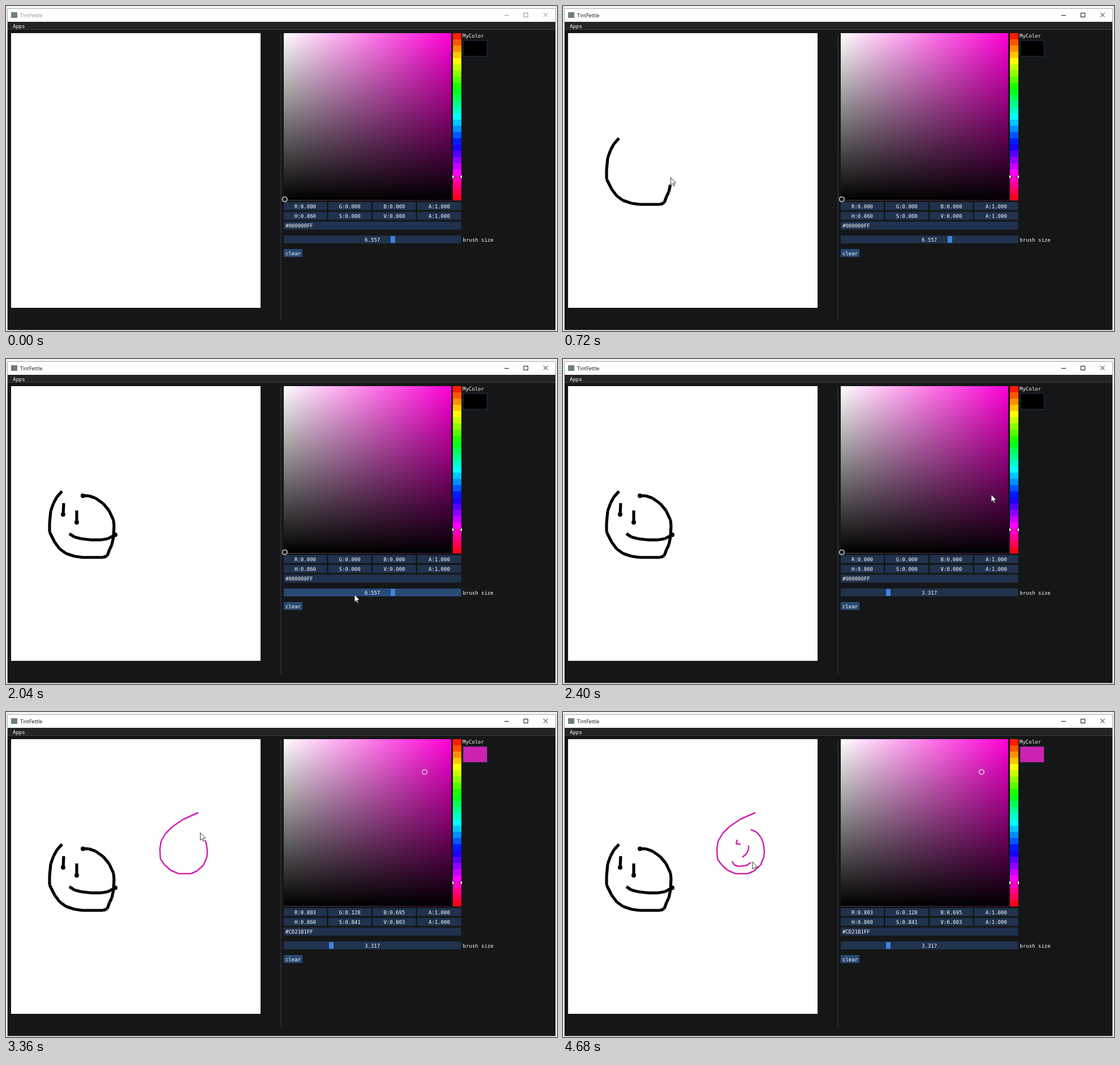
An HTML page with a canvas for the animation above (4800 ms loop, 974 by 575 pixels).

```html
<!DOCTYPE html>
<html lang="en">
<head>
<meta charset="utf-8">
<title>Paint app</title>
<style>
html, body { margin: 0; width: 100%; height: 100%; overflow: hidden; background: #f3f3f3; }
canvas { display: block; }
</style>
</head>
<body>
<canvas id="stage" width="974" height="575"></canvas>
<script>
const ctx = document.getElementById('stage').getContext('2d');
const LOOP = 4800, STEP = 120, LAG = 25;
const MONO = '9px "DejaVu Sans Mono", monospace';
const FIELD = '#20324d', HOVER = '#284a75', PINK = '#cd21b1';
const FOCUS_AT = 240, PICK_AT = 2640;

// Pointer legs: start, end, path, and an optional ink with its width and end dot.
const leg = (t0, t1, path, ink) => {
  const n = path.split(' ').map(Number);
  const pts = [];
  for (let i = 0; i < n.length; i += 2) pts.push([n[i], n[i + 1]]);
  return { t0, t1, pts, ink };
};
const black = { color: '#000', width: 5.2, dot: 4 };
const pink = { color: PINK, width: 2.5, dot: 0 };
const legs = [
  leg(120, 120, '130 205'),
  leg(240, 900, '99 234 90 244 84 255 79 269 77 290 77 306 86 324 95 336 106 344 121 349 135 351 172 351 179 348 183 337 187 329 190 315 191 295 190 285 182 268 172 256 158 246 146 242 136 242', black),
  leg(1050, 1150, '102 255 101 275', black),
  leg(1250, 1345, '125 268 125 289', black),
  leg(1440, 1440, '108 304'),
  leg(1480, 1690, '112 309 121 315 133 318 150 320 168 320 180 318 193 311', black),
  leg(1800, 1800, '540 446'),
  leg(2040, 2040, '616 417'),
  leg(2100, 2220, '600 413 575 413'),
  leg(2400, 2400, '757 240'),
  leg(2600, 2700, '740 106'),
  leg(2940, 3380, '340 178 313 190 294 203 282 215 274 229 272 243 273 260 280 270 291 280 305 286 327 286 338 281 349 271 355 257 356 246 354 232 350 222 343 213 332 208', pink),
  leg(3540, 3660, '308 226 306 233 314 234', pink),
  leg(3780, 3960, '328 236 328 243 324 251 317 257', pink),
  leg(4220, 4620, '299 264 302 270 309 273 322 272 327 270 332 266', pink),
  leg(4680, 4680, '335 265')
];
const drag = legs[8];

const clamp = v => Math.max(0, Math.min(1, v));
const mix = (a, b, k) => [a[0] + (b[0] - a[0]) * k, a[1] + (b[1] - a[1]) * k];
const dist = (a, b) => Math.hypot(b[0] - a[0], b[1] - a[1]);

// The part of a leg's path covered by time t, at constant speed.
function travelled({ t0, t1, pts }, t) {
  let total = 0;
  for (let i = 1; i < pts.length; i++) total += dist(pts[i - 1], pts[i]);
  let left = total * clamp((t - t0) / (t1 - t0 || 1));
  const out = [pts[0]];
  for (let i = 1; i < pts.length && left > 0; i++) {
    const d = dist(pts[i - 1], pts[i]);
    out.push(mix(pts[i - 1], pts[i], Math.min(1, left / d)));
    left -= d;
  }
  return out;
}

function pointerAt(t) {
  const i = legs.findLastIndex(l => l.t0 <= t);
  if (i < 0) return null;
  const cur = legs[i], next = legs[i + 1];
  if (t <= cur.t1 || !next) return travelled(cur, t).at(-1);
  return mix(cur.pts.at(-1), next.pts[0], (t - cur.t1) / (next.t0 - cur.t1));
}

function rect(x, y, w, h, fill) {
  ctx.fillStyle = fill;
  ctx.fillRect(x, y, w, h);
}

function text(str, x, y, align = 'left', font = MONO, fill = '#fff') {
  ctx.font = font;
  ctx.textAlign = align;
  ctx.fillStyle = fill;
  ctx.fillText(str, x, y);
}

function field(x, y, w, label) {
  rect(x, y, w, 14, FIELD);
  text(label, x + w / 2, y + 10.5, 'center');
}

function line(pts, color, width) {
  ctx.strokeStyle = color;
  ctx.lineWidth = width;
  ctx.beginPath();
  pts.forEach(p => ctx.lineTo(...p));
  ctx.stroke();
}

function ring(x, y, r, color, width) {
  ctx.strokeStyle = color;
  ctx.lineWidth = width;
  ctx.beginPath();
  ctx.arc(x, y, r, 0, 7);
  ctx.stroke();
}

function polygon(pts, fill) {
  ctx.fillStyle = fill;
  ctx.beginPath();
  pts.forEach(p => ctx.lineTo(...p));
  ctx.closePath();
  ctx.fill();
}

function drawWindow(active) {
  rect(0, 0, 974, 575, '#f3f3f3');
  rect(2, 4, 970, 570, '#a9a9a9');
  rect(3, 5, 968, 23, '#fff');
  rect(3, 28, 968, 545, '#151617');
  rect(3, 28, 968, 13, '#242424');
  rect(3, 41, 968, 1, '#404044');
  rect(9, 11, 11, 10, '#6f7d80');

  const tone = active ? '#111' : '#8c8c94';
  text('TintFettle', 25, 20, 'left', '9px "Open Sans", sans-serif', tone);
  line([[881, 16.5], [889, 16.5]], tone, 1);
  ctx.strokeRect(915.5, 12.5, 7, 7);
  line([[950, 12], [957.5, 19.5]], tone, 1);
  line([[957.5, 12], [950, 19.5]], tone, 1);

  text('Apps', 12, 39);
  rect(9, 48, 441, 486, '#fff');
  rect(485.5, 50, 1, 507, '#404047');
}

function drawPicker(picked) {
  const across = ctx.createLinearGradient(491, 0, 787, 0);
  across.addColorStop(0, '#fff');
  across.addColorStop(1, '#ff00d6');
  rect(491, 48, 296, 295.5, across);
  const down = ctx.createLinearGradient(0, 48, 0, 343);
  down.addColorStop(0, '#0000');
  down.addColorStop(1, '#000');
  rect(491, 48, 296, 295.5, down);

  const bands = 27;
  const edge = i => Math.round(48 + 295.5 * i / bands);
  for (let i = 0; i < bands; i++) {
    rect(790, edge(i), 15, edge(i + 1) - edge(i), `hsl(${(i + .5) / bands * 360} 100% 50%)`);
  }
  for (const [x, side] of [[789, 1], [806, -1]]) {
    polygon([[x, 298], [x + 5 * side, 302], [x, 306]], '#222');
    polygon([[x, 299], [x + 3.5 * side, 302], [x, 305]], '#fff');
  }

  const [x, y] = picked ? [740, 106] : [492.8, 342];
  ring(x, y, 5, picked ? '#8889' : '#555', 1);
  ring(x, y, 4.2, picked ? '#f3d5ef' : '#ddd', 1.3);

  text('MyColor', 807, 56);
  rect(807, 60.5, 44, 29, '#26334a');
  rect(808.5, 61.5, 41.5, 27, picked ? PINK : '#000');

  const rows = picked
    ? ['R:0.803 G:0.128 B:0.695 A:1.000', 'H:0.860 S:0.841 V:0.803 A:1.000']
    : ['R:0.000 G:0.000 B:0.000 A:1.000', 'H:0.860 S:0.000 V:0.000 A:1.000'];
  rows.forEach((row, r) => row.split(' ').forEach((label, c) =>
    field(491 + c * 78.7, 347 + r * 17.3, c < 3 ? 76 : 77.5, label)));
  rect(491, 381.5, 313.5, 14, FIELD);
  text(picked ? '#CD21B1FF' : '#000000FF', 494, 392);
}

function drawSlider(t, pointer) {
  const x = t < drag.t0 ? 683.87 : travelled(drag, t).at(-1)[0];
  const held = t >= drag.t0 && t <= drag.t1;
  const over = pointer && pointer[0] > 491 && pointer[0] < 805 && pointer[1] > 406 && pointer[1] < 420;
  rect(491, 406, 313.5, 14, over ? HOVER : FIELD);
  rect(x - 4, 407, 8, 12, held ? '#4296fa' : '#3d85e0');
  text((1 + (x - 497.15) / 33.6).toFixed(3), 647.5, 416.5, 'center');
  text('brush size', 807.5, 416.5);
  rect(491, 430, 33, 14, '#274a73');
  text('clear', 494, 440.5);
}

// Separate butt-ended segments leave the fine cracks at the joints.
function drawInk(t) {
  for (const l of legs) {
    if (!l.ink || t - LAG <= l.t0) continue;
    const { color, width, dot } = l.ink;
    const pts = travelled(l, t - LAG);
    for (let i = 1; i < pts.length; i++) line([pts[i - 1], pts[i]], color, width);
    if (dot && t - LAG >= l.t1) {
      ctx.fillStyle = color;
      ctx.beginPath();
      ctx.arc(...pts.at(-1), dot, 0, 7);
      ctx.fill();
    }
  }
}

function drawPointer([x, y]) {
  const shape = [[0, 0], [0, 13], [3, 10.3], [5, 15], [7, 14], [5, 9.5], [9, 9.2], [0, 0]]
    .map(p => [x + p[0], y + p[1]]);
  polygon(shape, '#fff');
  line(shape, '#222', .9);
}

function frame(now) {
  const t = Math.floor(now % LOOP / STEP) * STEP;
  const pointer = pointerAt(t);
  drawWindow(t >= FOCUS_AT);
  drawPicker(t >= PICK_AT);
  drawSlider(t, pointer);
  drawInk(t);
  if (pointer) drawPointer(pointer);
  requestAnimationFrame(frame);
}
requestAnimationFrame(frame);
</script>
</body>
</html>
```
